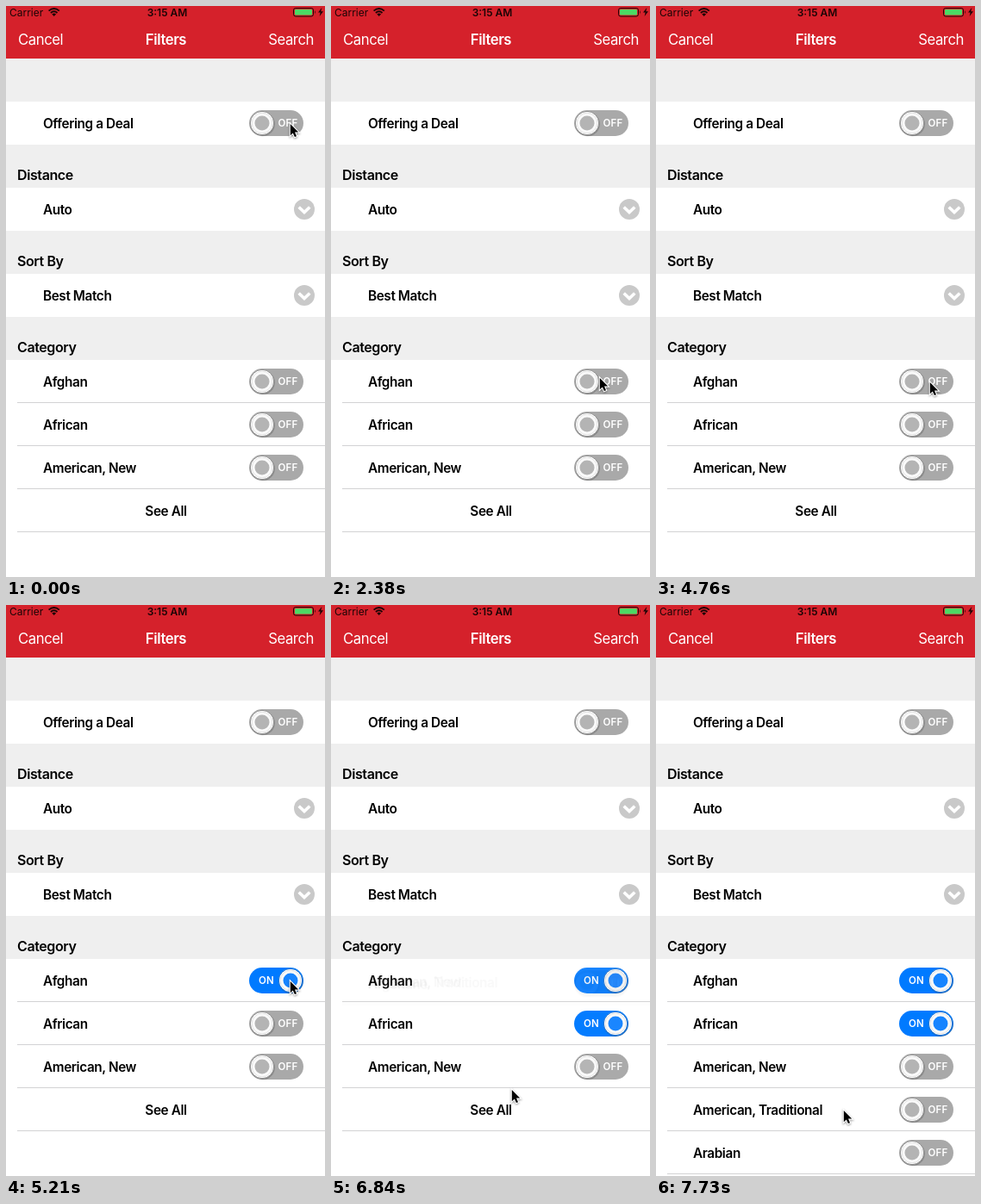
Write an HTML page that moves like this. It is 370 px wide and 663 px high and loops after 8 s.

```html
<!DOCTYPE html>
<html lang="en">
<head>
<meta charset="utf-8">
<title>Filters</title>
<style>
html, body { margin: 0; height: 100%; overflow: hidden; background: #fff; }
svg { display: block; width: 370px; height: 663px; font-family: Inter, Roboto, sans-serif; }
text { letter-spacing: -.025em; }
.row { font-size: 15.3px; font-weight: 600; }
.head { font-size: 16px; font-weight: 600; }
.nav { font-size: 16.7px; fill: #fff; }
.status { font-size: 12px; letter-spacing: 0; }
.state { font-size: 11.5px; font-weight: 600; fill: #fff; letter-spacing: .02em; }
</style>
</head>
<body>
<svg viewBox="0 0 370 663">
  <rect width="370" height="61" fill="#d5212b"/>
  <g fill="#1c0506">
    <text class="status" x="4" y="11.5">Carrier</text>
    <text class="status" x="187" y="11.5" text-anchor="middle" font-weight="600">3:15 AM</text>
    <g fill="none" stroke="#1c0506" stroke-width="1.9">
      <path d="M49.6 5.6Q55.7 .2 61.8 5.6M51.9 8Q55.7 4.6 59.5 8"/>
    </g>
    <path d="M53.3 9.5Q55.7 7.4 58.1 9.5L55.7 12Z"/>
    <rect x="333.5" y="2.5" width="23" height="9.5" rx="2.4" fill="none" stroke="#1c0506"/>
    <rect x="335" y="4" width="20" height="6.5" rx="1" fill="#4cd964"/>
    <path d="M358 5.2q1.8 2 0 4zM366.3 2l-4.3 5.6h2.6l-1 4.4 4.4-5.8h-2.7z"/>
  </g>
  <g class="nav">
    <text x="14" y="45">Cancel</text>
    <text x="185.5" y="45" text-anchor="middle" font-weight="600">Filters</text>
    <text x="357" y="45" text-anchor="end">Search</text>
  </g>
  <g id="list"></g>
  <path id="cursor" d="M.8 1V14.2L3.8 11.4 5.9 16.1 8 15.2 6 10.6H10.2Z" stroke="#fff" stroke-width="2.2"
    paint-order="stroke" style="filter:drop-shadow(0 1px 1px #0006)"/>
</svg>
<script>
const LOOP = 8000, STEP = 148.5;
const list = document.getElementById('list'), cursor = document.getElementById('cursor');

// Cursor stops: step, x, y
const stops = [
  [0, 329, 136], [5, 321, 137], [6, 309, 137], [7, 301, 136],
  [11, 307, 260], [12, 288, 423], [14, 296, 426], [15, 305, 429], [16, 311, 431],
  [24, 301, 433], [32, 317, 436], [33, 329, 436], [37, 326, 462], [38, 321, 484],
  [43, 262, 530], [44, 209, 562], [50, 212, 570], [51, 215, 579], [52, 217, 586]
];
const shortList = ['Afghan', 'African', 'American, New'];
const fullList = [...shortList, 'American, Traditional', 'Arabian', 'Argentine'];

const rect = (y, h, fill) => `<rect y="${y}" width="370" height="${h}" fill="${fill}"/>`;
const label = (s, y) => `<text class="row" x="43" y="${y + 30.5}">${s}</text>`;
const header = (s, y) => rect(y, 23, '#efefef') + `<text class="head" x="13" y="${y + 13.5}">${s}</text>`;
const fade = (opacity, s) => `<g opacity="${opacity}">${s}</g>`;
const line = y => `<rect x="13" y="${y + 49}" width="357" height="1" fill="#d2d2d4"/>`;

function toggle(y, on) {
  const x = on ? 330 : 297, tint = on ? '#007aff' : '#a9a9a9';
  return `<g transform="translate(0 ${y + 25})">
    <rect x="282" y="-15" width="63" height="30" rx="15" fill="${tint}"/>
    <text class="state" x="${on ? 302 : 327}" y="4" text-anchor="middle">${on ? 'ON' : 'OFF'}</text>
    <circle cx="${x + .6}" cy="1" r="14.3" fill="#0003"/>
    <circle cx="${x}" r="13.7" fill="#fff" stroke="${on ? '#1670d2' : '#8f8f8f'}"/>
    <circle cx="${x}" r="11.8" fill="#fafafa" stroke="#e2e2e2"/>
    <circle cx="${x}" r="8.5" fill="${on ? '#1684ff' : '#b4b4b4'}"/></g>`;
}

function picker(s, y) {
  return label(s, y) + `<circle cx="346" cy="${y + 25}" r="12" fill="#c9c9c9"/>
    <path d="M339.7 ${y + 22.5}l6.3 6 6.3-6" fill="none" stroke="#fff" stroke-width="3.6"/>`;
}

const option = (s, y, on) => rect(y, 50, '#fff') + label(s, y) + toggle(y, on) + line(y);

function draw(k) {
  const u = Math.min(1, Math.max(0, (k - 45.84) / 2));
  const p = u * u * (3 - 2 * u);
  const chosen = { Afghan: k >= 18 && k < 26 || k >= 35, African: k >= 40 };

  let out = rect(61, 50, '#efefef') + label('Offering a Deal', 111) + toggle(111, k >= 1 && k < 8);
  out += rect(161, 27, '#efefef') + header('Distance', 188) + picker('Auto', 211);
  out += rect(261, 27, '#efefef') + header('Sort By', 288) + picker('Best Match', 311);
  out += rect(361, 27, '#efefef');

  if (p < 1) {
    const rows = shortList.map((s, i) => option(s, 411 + 50 * i, chosen[s])).join('');
    const more = `<text class="row" x="185.5" y="591.5" text-anchor="middle">See All</text>` + line(561);
    out += fade(1 - p, header('Category', 388) + rows + more);
  }
  if (p > 0) {
    // Upper rows overlap the ones sliding out below them
    const rows = fullList.map((s, i) => fade(p, option(s, 411 + 50 * p * i, chosen[s])));
    out += rows.reverse().join('') + fade(p, header('Category', 388));
  }
  list.innerHTML = out;

  const [, x, y] = stops.filter(s => s[0] <= k).pop();
  cursor.setAttribute('transform', `translate(${x} ${y})`);
}

let last = -1;
function tick() {
  const k = Math.floor(performance.now() % LOOP / STEP);
  if (k !== last) draw(last = k);
  requestAnimationFrame(tick);
}
tick();
</script>
</body>
</html>
```
